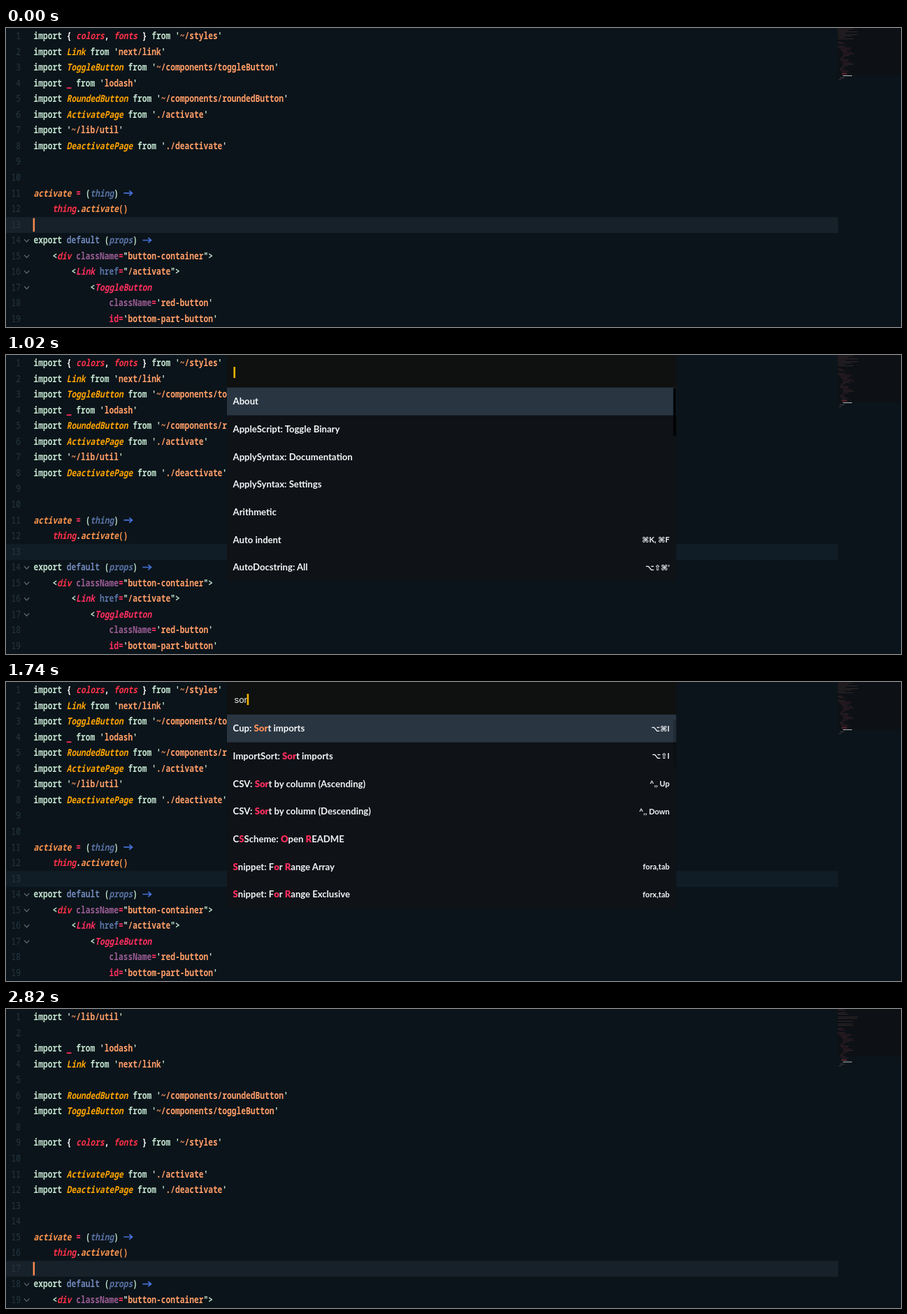
Write an HTML page that moves like this. It is 1280 px wide and 429 px high and loops after 2880 ms.

```html
<!DOCTYPE html>
<html lang="en">
<head>
<meta charset="utf-8">
<title>Sort imports</title>
<style>
html, body { margin: 0; width: 100%; height: 100%; overflow: hidden; background: #0b141a; }
svg { display: block; width: 100vw; height: 100vh; }
text { white-space: pre; }
.code { font: 600 13.8px "Noto Sans Mono", "DejaVu Sans Mono", monospace; }
.num { font-weight: 400; }
.item { font: 700 13.1px Lato, "Open Sans", sans-serif; fill: #f4f6f7; }
.item .hit { font-weight: 900; }
.keys { font: 700 11px Lato, "DejaVu Sans", sans-serif; fill: #f4f6f7; text-anchor: end; }
.query { font: 13.2px "Liberation Sans", Arial, sans-serif; fill: #eef0ee; }
</style>
</head>
<body>
<svg id="stage" viewBox="0 0 1280 429" preserveAspectRatio="none"></svg>
<script>
const LOOP = 2880, OPEN = 900, TYPE_SO = 1140, TYPE_SOR = 1500, SORTED = 1920;
const PITCH = 22.53, CELL = 6.755, LEFT = 39.5, BASE = 16.2;
const CONDENSE = CELL / (13.8 * 0.6);
const ROW = 39.67, LIST_TOP = 46.7;

const INK = {
  mint: '#bfe0cc', white: '#ffffff', red: '#ff3048', pink: '#ff2e5f', gold: '#ffa500',
  peach: '#ff9e68', orange: '#ff964f', steel: '#5872a4', blue: '#6f86b8', violet: '#985b92'
};

const stage = document.getElementById('stage');

function add(parent, tag, attrs, content) {
  const node = document.createElementNS('http://www.w3.org/2000/svg', tag);
  for (const key in attrs) node.setAttribute(key, attrs[key]);
  if (content !== undefined) node.textContent = content;
  parent.appendChild(node);
  return node;
}

const group = parent => add(parent, 'g', {});
const rect = (parent, x, y, width, height, fill) =>
  add(parent, 'rect', { x, y, width, height, fill });
const show = (node, on) => node.setAttribute('visibility', on ? 'visible' : 'hidden');

// A token is [ink, text]; a trailing "/" on the ink makes it italic.
const quoted = (s, q = "'") => [['mint', q], ['peach', s], ['mint', q]];
const load = (name, path) => [['mint', 'import '], ...name, ['mint', ' from '], ...quoted(path)];
const named = (name, path) => load([['gold/', name]], path);
const attr = (ink, name, value, q) => [[ink, name], ['pink', '='], ...quoted(value, q)];
const pad = n => ['mint', ' '.repeat(n)];

const styles = load([['white', '{ '], ['red/', 'colors'], ['white', ', '],
  ['red/', 'fonts'], ['white', ' }']], '~/styles');
const link = named('Link', 'next/link');
const toggle = named('ToggleButton', '~/components/toggleButton');
const lodash = load([['pink', '_']], 'lodash');
const rounded = named('RoundedButton', '~/components/roundedButton');
const on = named('ActivatePage', './activate');
const off = named('DeactivatePage', './deactivate');
const util = [['mint', 'import '], ...quoted('~/lib/util')];

const body = [
  [], [],
  [['orange/', 'activate'], ['pink', ' = '], ['mint', '('], ['steel/', 'thing'], ['mint', ') '], ['arrow', '  ']],
  [pad(4), ['red/', 'thing'], ['mint', '.'], ['orange/', 'activate'], ['orange', '()']],
  [],
  [['mint', 'export '], ['blue', 'default '], ['mint', '('], ['steel/', 'props'], ['mint', ') '], ['arrow', '  ']],
  [pad(4), ['mint', '<'], ['red/', 'div '], ...attr('violet', 'className', 'button-container', '"'), ['mint', '>']],
  [pad(8), ['mint', '<'], ['pink/', 'Link '], ...attr('steel', 'href', '/activate', '"'), ['mint', '>']],
  [pad(12), ['mint', '<'], ['pink/', 'ToggleButton']],
  [pad(16), ...attr('violet', 'className', 'red-button')],
  [pad(16), ...attr('pink', 'id', 'bottom-part-button')]
];

const messy = [styles, link, toggle, lodash, rounded, on, util, off];
const tidy = [util, [], lodash, link, [], rounded, toggle, [], styles, [], on, off];

function drawLine(parent, tokens, y) {
  const text = add(parent, 'text', {
    class: 'code', transform: `translate(${LEFT} ${y}) scale(${CONDENSE} 1)`
  });
  let col = 0;
  for (const [ink, s] of tokens) {
    const [name, italic] = ink.split('/');
    if (name === 'arrow') {
      const x = LEFT + col * CELL;
      add(parent, 'path', {
        d: `M${x + 0.5} ${y - 4.6}h12M${x + 8.5} ${y - 8.2}l4.2 3.6l-4.2 3.6`,
        fill: 'none', stroke: '#466fd6', 'stroke-width': 1.7
      });
    } else {
      add(text, 'tspan', {
        fill: INK[name], 'font-style': italic === undefined ? 'normal' : 'italic'
      }, s);
    }
    col += s.length;
  }
}

function drawMap(parent, imports, shift) {
  const dash = (x, y, w, fill, opacity = 0.38) =>
    add(parent, 'rect', { x: 1189 + x, y, width: w, height: 1, fill, opacity });
  rect(parent, 1189, 0, 91, 68, '#0d1116');
  imports.forEach((tokens, i) => {
    const n = tokens.reduce((sum, t) => sum + t[1].length, 0);
    if (n) dash(0.5, 1 + i * 2, n * 0.54, '#6b4440');
  });
  // indent and length of each code row
  const rows = [[0, 7], [2, 9], [0, 0], [0, 11], [2, 18], [4, 14], [6, 8], [8, 13], [8, 16],
    [8, 9], [6, 5], [4, 4], [4, 12], [6, 9], [8, 12], [8, 15], [8, 8], [6, 5], [4, 4],
    [4, 8], [6, 10], [6, 7]];
  rows.forEach(([x, w], i) => {
    if (w) dash(x, 20 + shift + i * 2.1, w, i % 3 ? '#78333f' : '#7d4a45');
  });
  dash(6, 65.5 + shift, 8, '#ff3d63', 0.5);
  dash(8, 68 + shift, 13, '#dde5e1', 0.8);
  dash(4, 71 + shift, 6, '#b7858b');
  dash(2, 73.5 + shift, 4, '#8c6f78');
}

function drawEditor(imports, shift) {
  const g = group(stage), active = imports.length + 4;
  const bar = rect(g, 0, 271.2 + (active - 12) * PITCH, 1190, 22.8, '#16212a');
  drawMap(g, imports, shift);
  [...imports, ...body].slice(0, 19).forEach((tokens, i) => {
    const y = BASE + i * PITCH;
    add(g, 'text', {
      class: 'code num', fill: '#263744', 'text-anchor': 'end',
      transform: `translate(21 ${y}) scale(${CONDENSE} 1)`
    }, i + 1);
    drawLine(g, tokens, y);
    if (i > active && i < active + 5) {
      add(g, 'path', {
        d: `M26 ${y - 6}l3.6 3.8l3.6 -3.8`, fill: 'none', stroke: '#66747b', 'stroke-width': 1.1
      });
    }
  });
  const caret = rect(g, 38.6, 272.8 + (active - 12) * PITCH, 2.5, 19.4, '#f58a50');
  return { g, bar, caret };
}

function drawPalette(query, caretX, thumb, items) {
  const g = group(stage);
  rect(g, 316, 0, 642.5, 324.5, '#0f1217');
  rect(g, 316, 0, 642.5, LIST_TOP, '#0e110f');
  rect(g, 316, LIST_TOP, 642.5, 39.8, '#293642');
  add(g, 'rect', { x: 954.3, y: thumb.y, width: 4, height: 68.5, fill: '#020405', opacity: thumb.alpha });
  add(g, 'text', { class: 'query', x: 326.6, y: 30 }, query);
  rect(g, caretX, 17, 2.6, 16, '#f0b000');
  items.forEach(([label, keys], i) => {
    const y = 71.4 + i * ROW;
    const text = add(g, 'text', { class: 'item', x: 324.6, y });
    // odd pieces lie inside brackets
    label.split(/[\[\]]/).forEach((part, k) => {
      if (part) add(text, 'tspan', k % 2
        ? { class: 'hit', fill: i ? '#ff2e5f' : '#f88d58' } : {}, part);
    });
    if (keys) add(g, 'text', { class: 'keys', x: 949, y: y - 0.8 }, keys);
  });
  return g;
}

const before = drawEditor(messy, 0);
const after = drawEditor(tidy, 7.5);

const empty = drawPalette('', 325.4, { y: 47.5, alpha: 1 }, [
  ['About'],
  ['AppleScript: Toggle Binary'],
  ['ApplySyntax: Documentation'],
  ['ApplySyntax: Settings'],
  ['Arithmetic'],
  ['Auto indent', '⌘K, ⌘F'],
  ['AutoDocstring: All', "⌥⇧⌘'"]
]);

const so = drawPalette('so', 340, { y: 57, alpha: 0.9 }, [
  ['Cup: [So]rt imports', '⌥⌘I'],
  ['ImportSort: [So]rt imports', '⌥⇧I'],
  ['CSV: [So]rt by column (Ascending)', '^,, Up'],
  ['CSV: [So]rt by column (Descending)', '^,, Down'],
  ['BracketHighlighter: [S]elect Tag Name (closing and [o]pening)'],
  ['Set Syntax: Nim [So]urce Code Filter'],
  ['[S]T: Ab[o]ut']
]);

const sor = drawPalette('sor', 344.6, { y: 54, alpha: 0.2 }, [
  ['Cup: [Sor]t imports', '⌥⌘I'],
  ['ImportSort: [Sor]t imports', '⌥⇧I'],
  ['CSV: [Sor]t by column (Ascending)', '^,, Up'],
  ['CSV: [Sor]t by column (Descending)', '^,, Down'],
  ['C[S]Scheme: [O]pen [R]EADME'],
  ['[S]nippet: F[o]r [R]ange Array', 'fora,tab'],
  ['[S]nippet: F[o]r [R]ange Exclusive', 'forx,tab']
]);

function draw(t) {
  const open = t >= OPEN && t < SORTED;
  before.g.setAttribute('display', t < SORTED ? 'inline' : 'none');
  after.g.setAttribute('display', t < SORTED ? 'none' : 'inline');
  before.bar.setAttribute('fill', open ? '#111d26' : '#16212a');
  show(before.caret, !open);
  show(empty, open && t < TYPE_SO);
  show(so, t >= TYPE_SO && t < TYPE_SOR);
  show(sor, t >= TYPE_SOR && t < SORTED);
}

function tick() {
  draw(performance.now() % LOOP);
  requestAnimationFrame(tick);
}
tick();
</script>
</body>
</html>
```
